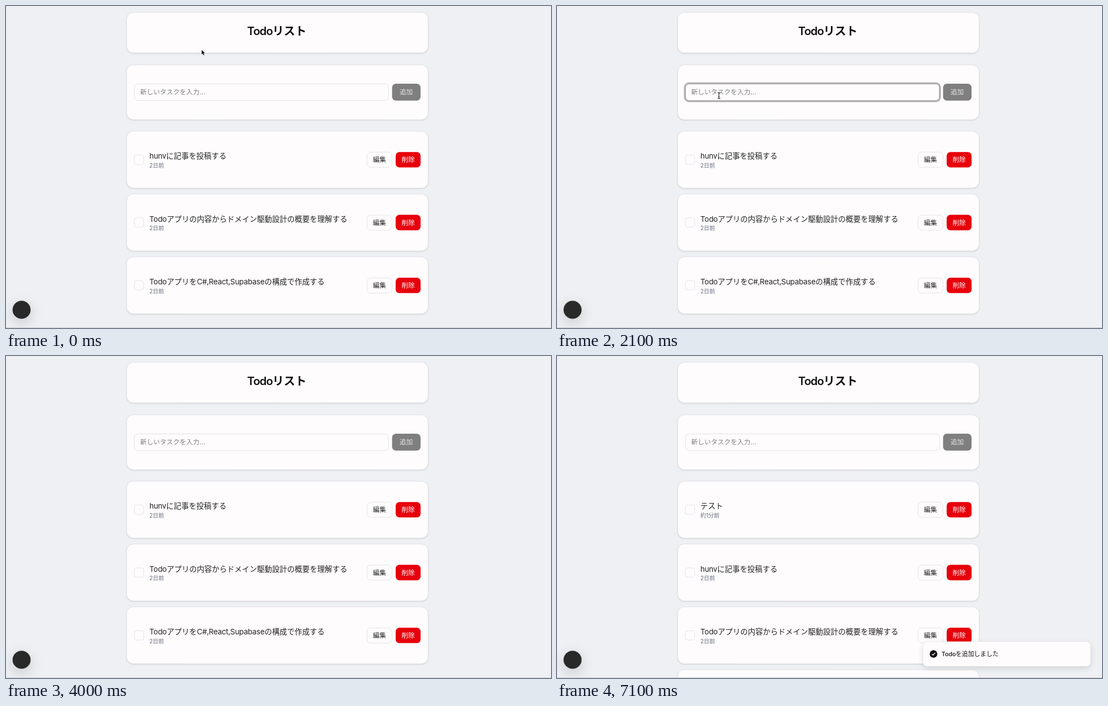
An HTML page with a canvas for the animation above (7200 ms loop, 973 by 576 pixels).

```html
<!DOCTYPE html>
<html lang="ja">
<head>
<meta charset="utf-8">
<title>Todoリスト</title>
<style>
html, body { margin: 0; width: 100%; height: 100%; overflow: hidden; background: #eef0f4; }
canvas { display: block; width: 973px; height: 576px; }
</style>
</head>
<body>
<canvas id="stage" lang="ja"></canvas>
<script>
const W = 973, H = 576, LOOP = 7200, STEP = 100;
const FAMILY = 'Inter, "Noto Sans CJK JP", "Noto Sans CJK", sans-serif';
const PAGE = '#eef0f4', CARD = '#fefcfd', INK = '#171717', LINE = '#e4e4e7';
const canvas = document.getElementById('stage');
const ctx = canvas.getContext('2d');
const dpr = window.devicePixelRatio || 1;
canvas.width = W * dpr;
canvas.height = H * dpr;

const TASKS = [
  ['hunvに記事を投稿する', '2日前'],
  ['Todoアプリの内容からドメイン駆動設計の概要を理解する', '2日前'],
  ['TodoアプリをC#,React,Supabaseの構成で作成する', '2日前']
];
const ADDED = [['テスト', '約1分前'], ...TASKS];

// Composition stages: start time, text, still being composed
const TYPING = [
  [2500, 'ｔ', true], [2600, 'て', true], [2700, 'てｓ', true], [2800, 'てす', true],
  [2900, 'てすｔ', true], [3000, 'てすと', true], [3200, 'テスト', true], [3300, 'テスト', false]
];
const POINTER = [[0, 349, 78], [400, 158, 146], [800, 284, 155], [1100, 289, 160]];
const FOCUS = 1420, TYPE = 2480, SUBMIT = 3550, REFRESH = 4700;

const clamp = v => Math.max(0, Math.min(1, v));
const ramp = (t, start, length) => clamp((t - start) / length);
const mix = (a, b, k) => a + (b - a) * k;
const smooth = k => k * k * (3 - 2 * k);

function box(x, y, w, h, r, fill, stroke, line = 1) {
  ctx.beginPath();
  ctx.roundRect(x, y, w, h, r);
  if (fill) { ctx.fillStyle = fill; ctx.fill(); }
  if (stroke) { ctx.strokeStyle = stroke; ctx.lineWidth = line; ctx.stroke(); }
}

function disc(x, y, r, fill) {
  ctx.fillStyle = fill;
  ctx.beginPath();
  ctx.arc(x, y, r, 0, Math.PI * 2);
  ctx.fill();
}

function shadow(color, blur, dy) {
  ctx.shadowColor = color;
  ctx.shadowBlur = blur * dpr;
  ctx.shadowOffsetY = dy * dpr;
}

// Latin runs are set slightly tighter than kana and kanji
function text(str, x, y, size, color, { weight = 400, center = false, track = -0.02 } = {}) {
  ctx.font = `${weight} ${size}px ${FAMILY}`;
  ctx.fillStyle = color;
  const runs = str.match(/[\x20-\x7e]+|[^\x20-\x7e]+/g).map(s => {
    const gap = (s.charCodeAt(0) < 127 ? track * size : 0) + 'px';
    ctx.letterSpacing = gap;
    return { s, gap, w: ctx.measureText(s).width };
  });
  const total = runs.reduce((sum, r) => sum + r.w, 0);
  let pos = center ? x - total / 2 : x;
  for (const r of runs) {
    ctx.letterSpacing = r.gap;
    ctx.fillText(r.s, pos, y);
    pos += r.w;
  }
  ctx.letterSpacing = '0px';
  return total;
}

function card(y, h) {
  ctx.save();
  shadow('rgba(0,0,0,0.16)', 3, 1);
  box(215.5, y, 538, h, 12, CARD);
  ctx.restore();
  box(215.5, y, 538, h, 12, null, '#e3e4e8', 0.85);
}

function task([title, age], y) {
  card(y, 101.5);
  box(229.2, y + 42.5, 16.6, 16.6, 3.6, CARD, LINE);
  text(title, 256, y + 49, 13.45, '#232323');
  text(age, 256, y + 64.8, 10.1, '#6b7280');
  box(644.5, y + 37.5, 44.6, 27, 6.5, CARD, LINE);
  text('編集', 666.7, y + 55.2, 11.77, '#262626', { center: true });
  box(695.7, y + 37.1, 44.5, 27.6, 6.7, '#e7000b');
  text('削除', 718, y + 55.2, 11.77, '#fff', { center: true });
}

function caret(x) {
  ctx.fillStyle = '#333';
  ctx.fillRect(x, 147.5, 0.9, 13);
}

function form(t) {
  card(105.5, 97.8);
  const ring = ramp(t, FOCUS, 125) * (1 - ramp(t, SUBMIT, 125));
  if (ring > 0) {
    const d = 2.5 * ring;
    box(229 - d, 139 - d, 454 + 2 * d, 30.4 + 2 * d, 6.7 + d, `rgba(161,161,161,${0.75 * ring})`);
  }
  const edge = Math.round(mix(227, 145, ring));
  box(229.3, 139.3, 453.4, 29.9, 6.5, CARD, `rgb(${edge},${edge},${edge})`);

  const entry = t < SUBMIT ? TYPING.filter(s => t >= s[0]).pop() : null;
  if (entry) {
    const w = text(entry[1], 240, 158.4, 11.77, '#262626');
    if (entry[2]) {
      ctx.fillStyle = '#4b8ef0';
      ctx.fillRect(240.3, 160.2, w - 0.6, 1.1);
    }
    caret(240 + w);
  } else {
    text('新しいタスクを入力...', 239.5, 158.4, 11.77, '#7f7f81', { track: 0 });
    if (t >= FOCUS && t < TYPE && (t - FOCUS) % 1000 < 500) caret(239.2);
  }

  const on = ramp(t, TYPE, 125) * (1 - ramp(t, SUBMIT, 125));
  const g = Math.round(mix(127, 23, on));
  box(689.3, 139, 50.8, 30.3, 6.7, `rgb(${g},${g},${g})`);
  text('追加', 714.5, 158.4, 11.77, '#e6e6e6', { center: true });
}

function badge() {
  ctx.save();
  shadow('rgba(0,0,0,0.18)', 24, 7);
  disc(27.8, 543.4, 16.1, '#292929');
  ctx.restore();
}

function toast(t) {
  const k = ramp(t, REFRESH - 60, 400);
  if (!k) return;
  const ease = 1 - (1 - k) ** 3;
  ctx.save();
  ctx.globalAlpha = ease;
  ctx.translate(0, 44 * (1 - ease));
  ctx.save();
  shadow('rgba(0,0,0,0.13)', 11, 3.4);
  box(653.5, 511, 299, 44, 6.7, CARD);
  ctx.restore();
  box(653.5, 511, 299, 44, 6.7, null, '#e8e8ea', 0.8);
  disc(672.2, 533, 6.8, '#111');
  ctx.strokeStyle = '#fff';
  ctx.lineWidth = 1.2;
  ctx.beginPath();
  ctx.moveTo(669.3, 533.2);
  ctx.lineTo(671.3, 535.2);
  ctx.lineTo(675.1, 531);
  ctx.stroke();
  text('Todoを追加しました', 686.5, 537, 10.93, INK, { weight: 500 });
  ctx.restore();
}

function pointer(t) {
  if (t >= TYPE) return;
  let i = POINTER.length - 1;
  while (POINTER[i][0] > t) i--;
  const a = POINTER[i], b = POINTER[i + 1] || a;
  const k = b === a ? 0 : smooth((t - a[0]) / (b[0] - a[0]));
  const x = mix(a[1], b[1], k), y = mix(a[2], b[2], k);
  ctx.save();
  ctx.translate(x, y);
  ctx.lineJoin = 'round';
  ctx.beginPath();
  if (x > 229 && x < 683 && y > 139 && y < 169) {
    ctx.moveTo(-2.4, -5.5);
    ctx.quadraticCurveTo(0, -5.5, 0, -4);
    ctx.quadraticCurveTo(0, -5.5, 2.4, -5.5);
    ctx.moveTo(0, -4);
    ctx.lineTo(0, 4);
    ctx.quadraticCurveTo(0, 5.5, -2.4, 5.5);
    ctx.moveTo(0, 4);
    ctx.quadraticCurveTo(0, 5.5, 2.4, 5.5);
    ctx.moveTo(-1.4, 1.7);
    ctx.lineTo(1.4, 1.7);
    ctx.strokeStyle = '#222';
    ctx.lineWidth = 1.1;
    ctx.stroke();
  } else {
    ctx.moveTo(0.4, 0.4);
    ctx.lineTo(0.4, 8.6);
    ctx.lineTo(2.2, 7);
    ctx.lineTo(3.6, 10.2);
    ctx.lineTo(5, 9.6);
    ctx.lineTo(3.7, 6.5);
    ctx.lineTo(6.2, 6.3);
    ctx.closePath();
    ctx.strokeStyle = '#fff';
    ctx.lineWidth = 1.4;
    ctx.stroke();
    ctx.fillStyle = '#111';
    ctx.fill();
  }
  ctx.restore();
}

function draw(t) {
  ctx.setTransform(dpr, 0, 0, dpr, 0, 0);
  ctx.fillStyle = PAGE;
  ctx.fillRect(0, 0, W, H);
  card(11.5, 72.3);
  text('Todoリスト', 483.5, 52.2, 20.2, '#111', { weight: 600, center: true, track: -0.045 });
  form(t);
  (t < REFRESH ? TASKS : ADDED).forEach((item, i) => task(item, 224.1 + 112.4 * i));
  badge();
  toast(t);
  ctx.fillStyle = '#c9cbd0';
  ctx.fillRect(0, 575, W, 1);
  pointer(t);
}

const start = performance.now();
function frame() {
  const t = (performance.now() - start) % LOOP;
  draw(Math.floor(t / STEP) * STEP);
  requestAnimationFrame(frame);
}
frame();
</script>
</body>
</html>
```
